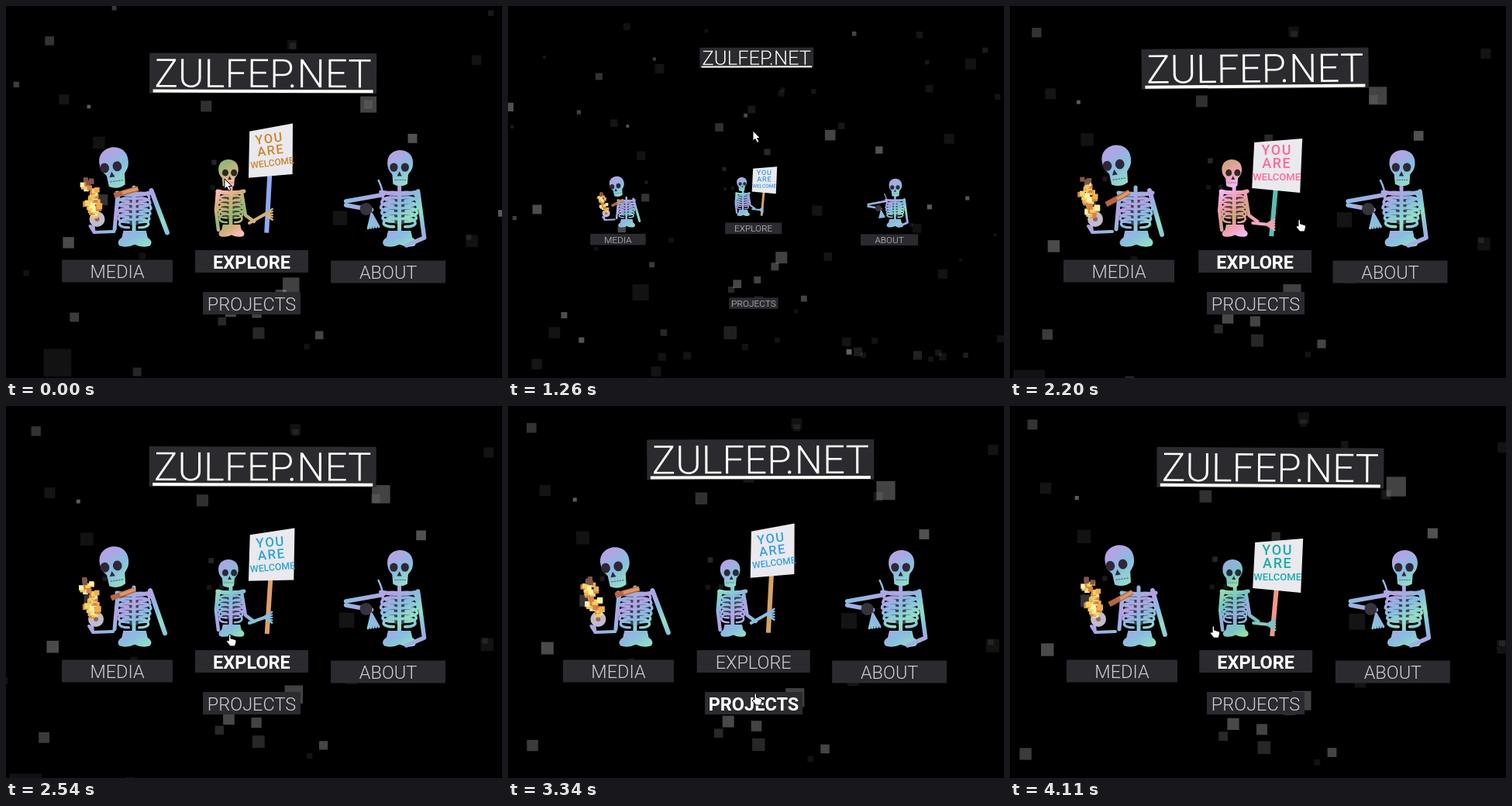
Write an HTML page with a canvas that moves like this. It is 640 px wide and 480 px high and loops after 4130 ms.

```html
<!DOCTYPE html>
<html lang="en">
<head>
<meta charset="utf-8">
<title>Skeleton menu</title>
<style>
html, body { margin: 0; width: 100%; height: 100%; overflow: hidden; background: #000; }
canvas, svg { position: absolute; left: 0; top: 0; width: 640px; height: 480px; }
text { font-family: Roboto, "Open Sans", sans-serif; text-anchor: middle; }
.label { font-size: 23.5px; font-weight: 300; fill: #cfcfd2; }
.label.hot { font-weight: 700; fill: #fff; }
.box { fill: #2a2a2f; }
.bone { fill: none; stroke: url(#bone); stroke-linecap: round; stroke-linejoin: round; }
.solid { fill: url(#bone); }
.dark { fill: #2e2836; }
.shade { fill: #3b4256; }
#words text { font-weight: 500; font-size: 17px; letter-spacing: 1.5px; }
#words .long { font-size: 12.3px; letter-spacing: 0; }
</style>
</head>
<body>
<canvas id="dust" width="640" height="480"></canvas>
<svg viewBox="0 0 640 480">
  <defs>
    <linearGradient id="bone" gradientUnits="userSpaceOnUse" x1="0" y1="-16" x2="20" y2="18" spreadMethod="reflect">
      <stop offset="0" stop-color="#b5a2e4"/>
      <stop offset=".5" stop-color="#88bde0"/>
      <stop offset="1" stop-color="#93dfc6"/>
    </linearGradient>
  </defs>
  <g id="title">
    <rect class="box" x="-146.5" y="-26" width="293" height="52"/>
    <text y="18" font-size="51" font-weight="300" fill="#fcfcf8">ZULFEP.NET</text>
    <rect x="-142" y="21" width="284" height="4" fill="#fdfdf6"/>
  </g>
  <g id="media"></g>
  <g id="explore"></g>
  <g id="about"></g>
  <g id="projects"></g>
  <g id="cursor" fill="#fff" stroke="#000">
    <path id="arrow" d="M0 0V13L3 10.500L5.500 15.500L8 14L5.500 9.500H9.500Z"/>
    <path id="hand" d="M3 9V1.500Q4.200 0 5.500 1.500V6L11 7.500Q13 8 12.500 10.500L11 16H5L0 10Q1 8 3 9Z"/>
  </g>
</svg>
<script>
const LOOP = 4130;
const $ = id => document.getElementById(id);
const ctx = $('dust').getContext('2d');
const clamp = v => Math.max(0, Math.min(1, v));
const smooth = v => (v = clamp(v), v * v * (3 - 2 * v));
const mix = (a, b, u) => a + (b - a) * u;
const mixAll = (a, b, u) => a.map((v, i) => mix(v, b[i], u).toFixed(2));
const set = (id, name, value) => $(id).setAttribute(name, value);
const rand = n => { const v = Math.sin(n * 127.1 + 11.7) * 43758.5453; return v - Math.floor(v); };

// Smooth path through [time, x, y] points
function along(keys, t) {
  let i = 0;
  while (i < keys.length - 2 && t >= keys[i + 1][0]) i++;
  const [t0, ...a] = keys[i], [t1, ...b] = keys[i + 1];
  return mixAll(a, b, smooth((t - t0) / (t1 - t0))).map(Number);
}

// Drawing helpers
const bone = (d, w, id = '') => `<path class="bone" ${id && `id="${id}"`} d="${d}" stroke-width="${w}"/>`;
const oval = (x, y, rx, ry, cls) => `<ellipse class="${cls}" cx="${x}" cy="${y}" rx="${rx}" ry="${ry}"/>`;
const label = (x, y, w, word) =>
  `<rect class="box" x="${x - w / 2}" y="${y - 14.5}" width="${w}" height="29"/>` +
  `<text class="label" x="${x}" y="${y + 9}">${word}</text>`;

const skull = (x, y, k, turn, look) => `<g transform="translate(${x} ${y}) rotate(${turn}) scale(${k})">
  <path class="solid" d="M-16-1C-17-23 17-23 16-1C16 7 12 10 10 13L9 25Q0 30-9 25L-10 13C-12 10-16 7-16-1Z"/>
  ${oval(look - 7, 4, 5, 5.5, 'dark')}${oval(look + 7, 4, 5, 5.5, 'dark')}
  <path class="dark" d="M${look} 9l3 6h-6z"/>
  <path d="M-7 20H7" stroke="#5d5a72" stroke-dasharray="2 1"/></g>`;

function ribs(x, y, w, h) {
  let d = '';
  for (let i = 0; i < 6; i++)
    for (const side of [-1, 1]) {
      const half = side * w * (.5 - Math.abs(i - 2) * .025);
      d += `M${x} ${y + i * h / 6.5}q${half} -3 ${half} 6q${-half * .1} 4 ${-half * .65} 4`;
    }
  return oval(x, y + h * .45, w * .42, h * .48, 'shade') + bone(d, w * .075) +
    bone(`M${x} ${y - 8}V${y + h + 8}`, 5) +
    bone(`M${x - w / 2} ${y - 1}Q${x} ${y + 4} ${x + w / 2} ${y - 1}`, 5);
}

const pelvis = (x, y, k) => `<path class="solid" transform="translate(${x} ${y}) scale(${k})"
  d="M-15 0H15L17 9Q25 14 20 20Q10 23 0 18Q-10 23-20 20Q-25 14-17 9Z"/>`;
const fan = (w, reach) => {
  let d = '';
  for (let i = -2; i <= 2; i++) d += `M0 0l${reach} ${i * 3.5}`;
  return bone(d, w);
};

$('media').innerHTML = `
  ${ribs(164, 242, 44, 44)}${pelvis(165, 290, .98)}
  ${bone('', 6, 'mediaArm')}
  ${bone('M143 243L139 288', 5)}
  <g id="mediaHead">${skull(138, 203, 1.17, -8, -4)}</g>
  <path id="stick" stroke="#b8634a" stroke-width="7"/><path id="tip" stroke="#dc9a62" stroke-width="4"/>
  <g id="fist">${bone('M139 290L113 291M113 291L108 283M113 291L112 282', 4)}
    <circle cx="117" cy="274" r="10" fill="#c4bcca"/><circle cx="117" cy="274" r="3" fill="#8d6570"/></g>
  <g id="fire"></g>
  ${label(142.5, 342, 143, 'MEDIA')}`;

$('explore').innerHTML = `
  <g id="tinted">
    ${bone('M273 240L271 264L274 289', 4.5)}
    ${ribs(290, 240, 34, 38)}${pelvis(291, 282, .75)}
    ${skull(287, 212, .8, 0, 2)}
    <path id="pole" stroke="#d6a264" stroke-width="6"/>
    ${bone('M304 240L309 270L320 278', 4.5)}
    ${bone('', 4, 'grip')}
    <g id="gripHand">${fan(2.4, 11)}</g>
  </g>
  <polygon id="board" fill="#e9e9ee"/>
  <g id="words" fill="#3a9fe0">
    <text y="-9">YOU</text><text y="7">ARE</text><text class="long" y="22">WELCOME</text>
  </g>
  ${label(317, 329.5, 146, 'EXPLORE')}`;

$('about').innerHTML = `
  ${bone('M481 225Q486 235 487 245', 2.5)}
  ${ribs(508, 241, 48, 44)}${pelvis(508, 290, .98)}
  ${bone('M484 244L439 252M439 257L472 263', 5.5)}
  ${bone('M532 239L540 299L517 309', 5.5)}
  <circle cx="465" cy="262" r="8" fill="#35343a"/>
  <g transform="translate(472 268) rotate(82)">${fan(3, 18)}</g>
  ${skull(509, 204, 1.03, 0, -1)}
  ${label(493.5, 343, 148, 'ABOUT')}`;

$('projects').innerHTML = label(317, 383.5, 126, 'PROJECTS');

const sparks = Array.from({ length: 36 }, () =>
  $('fire').appendChild(document.createElementNS('http://www.w3.org/2000/svg', 'rect')));
const words = {};
for (const id of ['explore', 'projects']) words[id] = $(id).querySelector('.label');

// Square flakes scattered through a deep field in front of the camera
const flakes = Array.from({ length: 270 }, (_, i) => ({
  x: (rand(i + 1) - .5) * 2000,
  y: (rand(i + 301) - .5) * 1600,
  z: .65 + rand(i + 601) * 1.3,
  size: 8 + 20 * rand(i + 901) ** 1.5,
  glow: .08 + .36 * rand(i + 1201) ** 4
}));

const cursorKeys = [[0, 282, 223], [570, 276, 248], [1260, 316, 161], [2200, 369, 275],
  [2860, 208, 311], [3340, 315, 370], [4130, 258, 283]];

function drawDust(t, scale, sway) {
  const camera = 1.15 * (1 - scale) - t * .00004;
  ctx.clearRect(0, 0, 640, 480);
  for (const { x, y, z, size, glow } of flakes) {
    const zoom = 1 / (z + camera), side = size * zoom;
    ctx.fillStyle = `rgba(228, 228, 232, ${glow})`;
    ctx.fillRect(320 + sway + x * zoom - side / 2, 240 + y * zoom - side / 2, side, side);
  }
}

function drawPoses(t, p) {
  const line = (id, a, b) => {
    const [x1, y1, x2, y2] = mixAll(a, b, p);
    set(id, 'd', `M${x1} ${y1}L${x2} ${y2}`);
  };
  line('mediaArm', [187, 238, 208, 292], [182, 238, 198, 295]);
  line('stick', [140, 243, 171, 235], [126, 256, 156, 240]);
  line('tip', [150, 240, 171, 235], [140, 249, 156, 240]);
  line('pole', [340, 212, 336, 292], [344, 232, 338, 297]);
  line('grip', [314, 280, 336, 266], [314, 280, 334, 282]);
  set('mediaHead', 'transform', `translate(${p * 1.5} ${p * -3})`);
  set('fist', 'transform', `translate(${p * -5} 1)`);
  set('gripHand', 'transform', `translate(${mixAll([333, 267], [331, 282], p)})`);
  set('board', 'points', mixAll([314, 160, 369, 149, 369, 214, 313, 220], [316, 176, 378, 171, 375, 241, 313, 235], p));
  const [x, y, turn, k] = mixAll([341, 183, -8, .96], [345, 202, 0, 1.06], p);
  set('words', 'transform', `translate(${x} ${y}) rotate(${turn}) scale(${k})`);

  sparks.forEach((spark, i) => {
    const h = (t * 8 / LOOP + i / sparks.length) % 1, size = 8 - 2 * h;
    const x = 115 - 12 * h - p * 6 + (rand(i + 70) - .5) * (12 + 44 * h * (1 - h));
    spark.setAttribute('x', x - size / 2);
    spark.setAttribute('y', 270 - 47 * h - size / 2);
    spark.setAttribute('width', size);
    spark.setAttribute('height', size);
    spark.setAttribute('fill', h > .88 ? '#80564c' : ['#f3d565', '#efb04c', '#fbf1a6', '#d98245'][i % 4]);
  });
}

function draw(t) {
  const [cx, cy] = along(cursorKeys, t);
  const scale = t < 500 ? 1 - smooth((t - 60) / 420) : smooth((t - 820) / 880);

  // The whole scene leans away from the pointer
  const lean = (370 - cx) * .178;
  drawDust(t, scale, lean * .45);
  drawPoses(t, .5 + .5 * Math.cos((t - 2200) / 477 * 2 * Math.PI));
  const drop = 74.5 - (cy - 276) * .12 - 33;
  set('title', 'transform',
    `translate(${316 + lean * scale} ${39 + drop * scale}) rotate(${(lean - 12) * .04}) scale(${scale})`);
  const place = (id, x, y, dx) =>
    set(id, 'transform', `translate(${x + dx} ${y}) scale(${scale}) translate(${-x} ${-y})`);
  place('media', 141.5, 260, lean * .2 - 2);
  place('explore', 317, 244, lean * .05 - .8);
  place('about', 493.5, 260, lean * .17 - 3);
  place('projects', 317, 383.5, 0);

  // Hovering the sign cycles its hue from the moment the pointer enters
  const hover = [[-298, 250], [2000, 2550], [3607, LOOP]].find(([from, to]) => t >= from && t < to);
  const tint = hover ? `hue-rotate(${(t - hover[0]) * .65}deg)` : 'none';
  for (const id of ['tinted', 'words']) $(id).style.filter = tint;
  words.explore.classList.toggle('hot', !!hover);
  words.projects.classList.toggle('hot', t > 3150 && t < 3520);

  const pointing = t > 1950;
  set('cursor', 'transform', `translate(${cx} ${cy})`);
  set('arrow', 'visibility', pointing ? 'hidden' : 'visible');
  set('hand', 'visibility', pointing ? 'visible' : 'hidden');
}

const begin = performance.now();
function tick() {
  draw((performance.now() - begin) % LOOP);
  requestAnimationFrame(tick);
}
tick();
</script>
</body>
</html>
```
